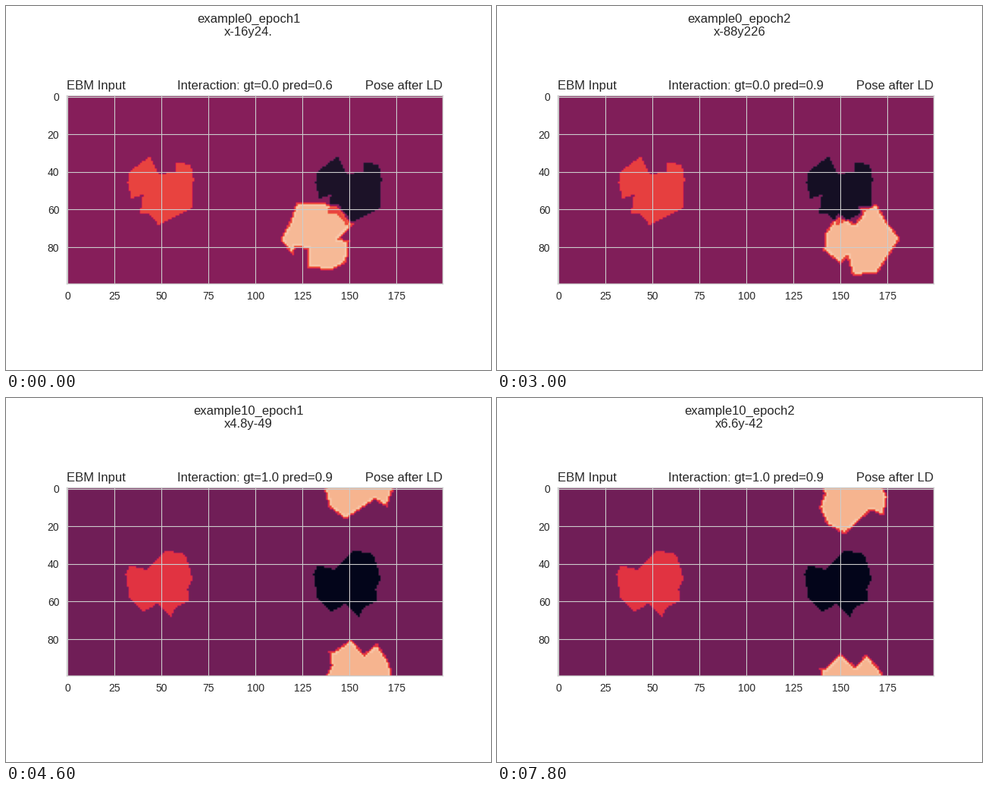
Animation of 640 by 480 pixels, one loop 8000 ms. Source, as a matplotlib script:

```python
import numpy as np
import matplotlib.pyplot as plt
from matplotlib.animation import FuncAnimation
from matplotlib.colors import LinearSegmentedColormap
from matplotlib.path import Path

plt.rcParams.update({
    "font.family": "Liberation Sans", "text.color": ".15",
    "axes.edgecolor": ".8", "axes.linewidth": 1, "axes.axisbelow": True,
    "axes.grid": True, "grid.color": ".8", "grid.linewidth": .8,
    "xtick.color": ".15", "ytick.color": ".15",
    "xtick.major.size": 0, "ytick.major.size": 0,
    "xtick.major.pad": 7, "ytick.major.pad": 7,
})

CMAP = LinearSegmentedColormap.from_list("heat", [
    (0, "#03051a"), (.075, "#1b1227"), (.143, "#35193e"), (.286, "#701f57"),
    (.35, "#8a1e5b"), (.429, "#ad1759"), (.571, "#e13342"), (.62, "#ec4b3e"),
    (.714, "#f37651"), (.857, "#f6b48f"), (1, "#faebdd")])

N = 100          # cells along one panel side
HOLD = 6         # frames per run
SPIN = 17.4      # degrees per frame in epoch 1, doubled in epoch 2
HIGH = 2.5       # upper colour limit

# Corner points around the centre of each body, in cells
RECEPTORS = [
    [(-16.8, -10.5), (-6, -18), (-1.5, -9), (7.5, -9.5), (8, -15),
     (15.5, -13.5), (17, -6), (16, 9.5), (-1.5, 18.3), (-6.5, 12.3),
     (-11.5, 12), (-9.6, 1.8), (-15.8, 4.2), (-18, -4)],
    [(-19, -4.5), (-17, -9), (-8, -6.8), (2.5, -17), (12.5, -15),
     (16.6, -2), (13.8, 3), (14.4, 10), (8, 12.5), (5, 18.2), (-2, 11),
     (-9.8, 15.2), (-17, 8.5)],
]
LIGANDS = [
    [(-11.5, -17.3), (10, -16.3), (18, -6), (10.5, 2), (16, 3), (14.5, 14),
     (7, 18.2), (-5.5, 17), (-5.5, 7), (-12.5, 6), (-14, 10), (-20.2, 2.2),
     (-15.5, -6.5)],
    [(-17.5, 1), (-15, 10.5), (-6.5, 16.8), (2, 11), (9, 6.3), (15.3, 10),
     (18.5, 1), (16, -8), (10, -17), (3.2, -11.3), (-3.6, -19.3),
     (-12.5, -13), (-15.3, -13), (-14, -5.6)],
]

# example, epoch, shift x, shift y, start angle, lower colour limit
RUNS = [
    (0, 1, -16.0, 24.3, 0, -1.3),
    (0, 2, 10.8, 27.9, 10, -1.3),
    (0, 2, -88.9, 226.9, 86, -1.22),
    (10, 1, 4.8, -49.9, -52, -1),
    (10, 2, 5.9, -39.9, 54, -1),
    (10, 2, 6.1, -40.9, -110, -1),
    (10, 2, 6.6, -42.9, -43, -1),
]


def depth(pts, corners):
    """Signed distance to the outline, positive inside."""
    a = np.array(corners)
    ab = np.roll(a, -1, axis=0) - a
    ap = pts[:, None] - a
    t = np.clip((ap * ab).sum(2) / (ab ** 2).sum(1), 0, 1)
    d = np.linalg.norm(ap - t[..., None] * ab, axis=2).min(1)
    return np.where(Path(a).contains_points(pts), d, -d).reshape(N, N)


ys, xs = np.mgrid[:N, :N]
CELLS = np.column_stack([xs.ravel(), ys.ravel()]).astype(float)
BODIES = [(depth(CELLS - (50, 50.3), r) > -.1).astype(float)
          for r in RECEPTORS]


def ligand(corners, x, y, deg):
    """Rotated ligand with a rim, on a panel whose edges wrap around."""
    rel = (CELLS - (x, y)) % N
    rel[rel > N / 2] -= N
    c, s = np.cos(np.radians(deg)), np.sin(np.radians(deg))
    d = depth(rel @ np.array([[c, -s], [s, c]]), corners)
    return np.array([0, 1, 2.15, 2])[np.digitize(d, [-.4, .6, 1.6])]


fig, ax = plt.subplots(figsize=(6.4, 4.8), dpi=100)
im = ax.imshow(np.zeros((N, 2 * N)), cmap=CMAP)
head = fig.suptitle("")
ax.set_title("EBM Input", loc="left")
ax.set_title("Pose after LD", loc="right")
score = ax.set_title("")


def update(i):
    n = max(0, (i - 2) // HOLD)
    start = 2 + HOLD * n if n else 0
    example, epoch, x, y, angle, low = RUNS[n]
    kind = int(example > 0)
    turn = angle + SPIN * epoch * (i - start)
    body = BODIES[kind]
    pose = ligand(LIGANDS[kind], x + 49.7, y + 49.7, turn) - body
    im.set_data(np.hstack([body, pose]))
    im.set_clim(low, HIGH)
    head.set_text(f"example{example}_epoch{epoch}\n"
                  f"x{str(x)[:3]}y{str(y)[:3]}")
    score.set_text(f"Interaction: gt={kind:.1f} pred={.9 if n else .6}")
    return im, head, score


anim = FuncAnimation(fig, update, frames=40, interval=200, repeat=True)
plt.show()
```
